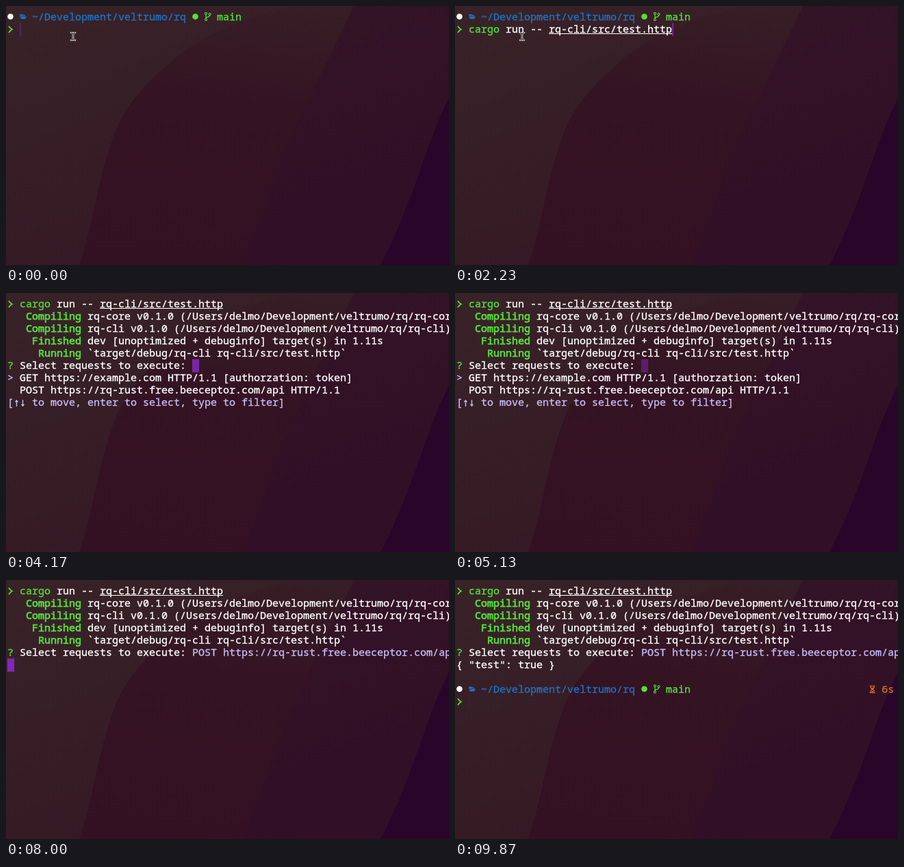
Write an HTML page that moves like this. It is 647 by 379 pixels and loops after 9.91 s.

```html
<!DOCTYPE html>
<html lang="en">
<head>
<meta charset="utf-8">
<title>Terminal session</title>
<style>
  html, body { margin: 0; width: 100%; height: 100%; overflow: hidden; background: #321323; }
  #stage { position: relative; width: 647px; height: 379px; overflow: hidden; }
  #stage > * { position: absolute; }
  #wallpaper { left: 0; top: 0; }
  #screen {
    left: 2px; top: 6px; margin: 0; color: #fff;
    font: 15px/18px "Noto Sans Mono", monospace;
    font-variant-ligatures: none;
    -webkit-text-stroke: 0.35px;
  }
  .cell { display: inline-block; width: 9px; height: 18px; vertical-align: top; }
  .cell svg { display: block; margin-top: 1px; overflow: visible; }
  .green { color: #55e03c; }
  .blue { color: #1c74c6; }
  .lilac { color: #c6bdf8; }
  .orange { color: #e2701f; }
  .hint { color: #5d4c52; }
  .bold { -webkit-text-stroke-width: 0.75px; }
  .link { text-decoration: underline 1px; text-underline-offset: 1px; text-decoration-skip-ink: none; }
  #cursor { background: #8128b4; box-shadow: 0 0 1px #8128b4; height: 19px; }
  #mouse { left: 93px; top: 38px; }
</style>
</head>
<body>
<div id="stage">
  <svg id="wallpaper" width="647" height="379">
    <defs>
      <linearGradient id="left" x2="0.45" y2="1">
        <stop offset="0" stop-color="#382328"/><stop offset="1" stop-color="#351924"/>
      </linearGradient>
      <linearGradient id="middle" x1="0.6" y1="0" x2="0.4" y2="1">
        <stop offset="0" stop-color="#371d26"/><stop offset="0.4" stop-color="#341322"/>
        <stop offset="1" stop-color="#331123"/>
      </linearGradient>
      <linearGradient id="right" x2="0.3" y2="1">
        <stop offset="0" stop-color="#341426"/><stop offset="1" stop-color="#300f27"/>
      </linearGradient>
    </defs>
    <rect width="647" height="379" fill="url(#middle)"/>
    <path d="M0 0H420Q300 30 245 78Q180 132 161 180Q143 225 128 300Q118 345 107 379H0Z" fill="url(#left)"/>
    <path d="M508 0Q470 80 434 152Q398 230 380 288Q365 335 345 379H647V0Z" fill="url(#right)"/>
    <path d="M647 135Q628 172 608 231Q575 327 547 379H647Z" fill="#280529"/>
  </svg>
  <div id="cursor"></div>
  <pre id="screen"></pre>
  <svg id="mouse" width="10" height="14" fill="none" stroke-linecap="round">
    <path id="beam" d="M2 1Q5 1 5 3Q5 1 8 1M5 3V10M2 12Q5 12 5 10Q5 12 8 12"/>
    <use href="#beam" stroke="#e9e4e6" stroke-width="2.6"/>
    <use href="#beam" stroke="#20151a" stroke-width="1"/>
  </svg>
</div>
<script>
const LOOP = 9910;
const T = {
  keys: [560, 680, 790, 900, 1000, 1110],
  accept: 1460, enter: 2900, compile: 2970, compileCli: 3330,
  menu: 3990, down: 5670, choose: 7900, response: 9000
};
const BLINK = 800;

const $ = id => document.getElementById(id);
const span = (cls, text) => `<span class="${cls}">${text}</span>`;
const green = text => span('green', text);
const lilac = text => span('lilac', text);
const status = (word, cls = 'green') => span(cls + ' bold', word.padStart(12));
const icon = (cls, shape) =>
  span('cell ' + cls, `<svg width="9" height="18" fill="none" stroke="currentColor">${shape}</svg>`);
const dot = cls => icon(cls, '<circle cx="4.5" cy="8.5" r="4.3" fill="currentColor" stroke="none"/>');

const folder = icon('blue',
  '<path d="M.5 5H4L5 6H8V7.5H2.5L.5 11ZM3 8.3H10L8 12H1Z" fill="currentColor" stroke="none"/>');
const branch = icon('green',
  '<g stroke-width="1.2"><circle cx="2" cy="4" r="1.5"/><circle cx="7.5" cy="5" r="1.5"/>' +
  '<circle cx="2" cy="13" r="1.5"/><path d="M2 5.5V11.5M7.5 6.5Q7.5 9 4.5 9.2Q2 9.4 2 11.5"/></g>');
const hourglass = icon('orange',
  '<path d="M.5 4H8.5M.5 14H8.5M1.5 4Q1.5 7 4 9Q1.5 11 1.5 14M7.5 4Q7.5 7 5 9Q7.5 11 7.5 14" stroke-width="1.2"/>' +
  '<path d="M2.5 6.5H6.5L4.5 9ZM2 13.5L4.5 11L7 13.5Z" fill="currentColor" stroke="none"/>');
const chevron = icon('green', '<path d="M2 4.5Q4.5 8 6.8 9.3Q4.5 10.6 2 14" stroke-width="1.8"/>');

const header = `${dot('')} ${folder} ${span('blue', '~/Development/veltrumo/rq')} ` +
  `${dot('green')} ${branch} ${green('main')}`;
const COMMAND = 'cargo run -- rq-cli/src/test.http';
const command = `${chevron} ${green('cargo')} run -- ${span('link', 'rq-cli/src/test.http')}`;
const compiling = name =>
  `${status('Compiling')} ${name} v0.1.0 (/Users/delmo/Development/veltrumo/rq/${name})`;
const building = (done, name) =>
  `${status('Building', 'lilac')} [${'='.repeat(23)}&gt; ] ${done}/134: ${name}`;
const buildLog = [
  command, compiling('rq-core'), compiling('rq-cli'),
  `${status('Finished')} dev [unoptimized + debuginfo] target(s) in 1.11s`,
  `${status('Running')} \`target/debug/rq-cli rq-cli/src/test.http\``
];
const question = `${green('?')} Select requests to execute: `;
const POST = 'POST https://rq-rust.free.beeceptor.com/api HTTP/1.1';
const requests = ['GET https://example.com HTTP/1.1 [authorzation: token]', POST];
const arrows = span('cell bold', '↑') + span('cell bold', '↓');
const help = lilac(`[${arrows} to move, enter to select, type to filter]`);

// Returns the lines, the cursor cell and the time its blink last restarted.
function session(t) {
  if (t < T.accept) {
    const typed = T.keys.filter(key => key <= t).length;
    const input = typed
      ? green(COMMAND.slice(0, typed)) + span('hint', COMMAND.slice(typed)) : '';
    return { lines: [header, `${chevron} ${input}`], col: 2 + typed, row: 1, beam: true,
      since: typed ? T.keys[typed - 1] : -1050 };
  }
  if (t < T.enter)
    return { lines: [header, command], col: 35, row: 1, beam: true, since: Math.min(t, 1970) };
  if (t < T.compile)
    return { lines: [command], col: 0, row: 1, since: T.enter };
  if (t < T.compileCli)
    return { lines: [...buildLog.slice(0, 2), building(132, 'rq-core')], col: 0, row: 2, since: T.compile };
  if (t < T.menu)
    return { lines: [...buildLog.slice(0, 3), building(133, 'rq-cli(bin)')], col: 0, row: 3, since: T.compileCli };
  if (t < T.choose) {
    const selected = t < T.down ? 0 : 1;
    const options = requests.map((text, i) => `${i === selected ? lilac('&gt;') : ' '} ${text}`);
    return { lines: [...buildLog, question, ...options, help], col: 30, row: 5,
      since: selected ? T.down : T.menu };
  }
  const answered = [...buildLog, question + lilac(POST)];
  if (t < T.response)
    return { lines: answered, col: 0, row: 6, since: T.choose };
  const prompt = `${header}${' '.repeat(29)}${hourglass} ${span('orange', '6s')}`;
  return { lines: [...answered, '{ "test": true }', '', prompt, chevron],
    col: 2, row: 9, beam: true, since: T.response };
}

let shown = '';
function draw(now) {
  const t = now % LOOP;
  const { lines, col, row, beam, since } = session(t);
  const html = lines.join('\n');
  if (html !== shown) $('screen').innerHTML = shown = html;

  const phase = (t - since) / BLINK % 2;
  const cursor = $('cursor').style;
  cursor.left = 2 + col * 9 + 'px';
  cursor.top = 7 + row * 18 + 'px';
  cursor.width = beam ? '2px' : '10px';
  cursor.opacity = Math.min(1, 1.15 * Math.abs(1 - phase));

  const hiding = Math.min(1, Math.max(0, (t - 2930) / 80));
  $('mouse').style.opacity = 1 - hiding;
  $('mouse').style.transform = `scale(${1 - hiding / 2})`;
}

function tick() {
  draw(performance.now());
  requestAnimationFrame(tick);
}
tick();
</script>
</body>
</html>
```
